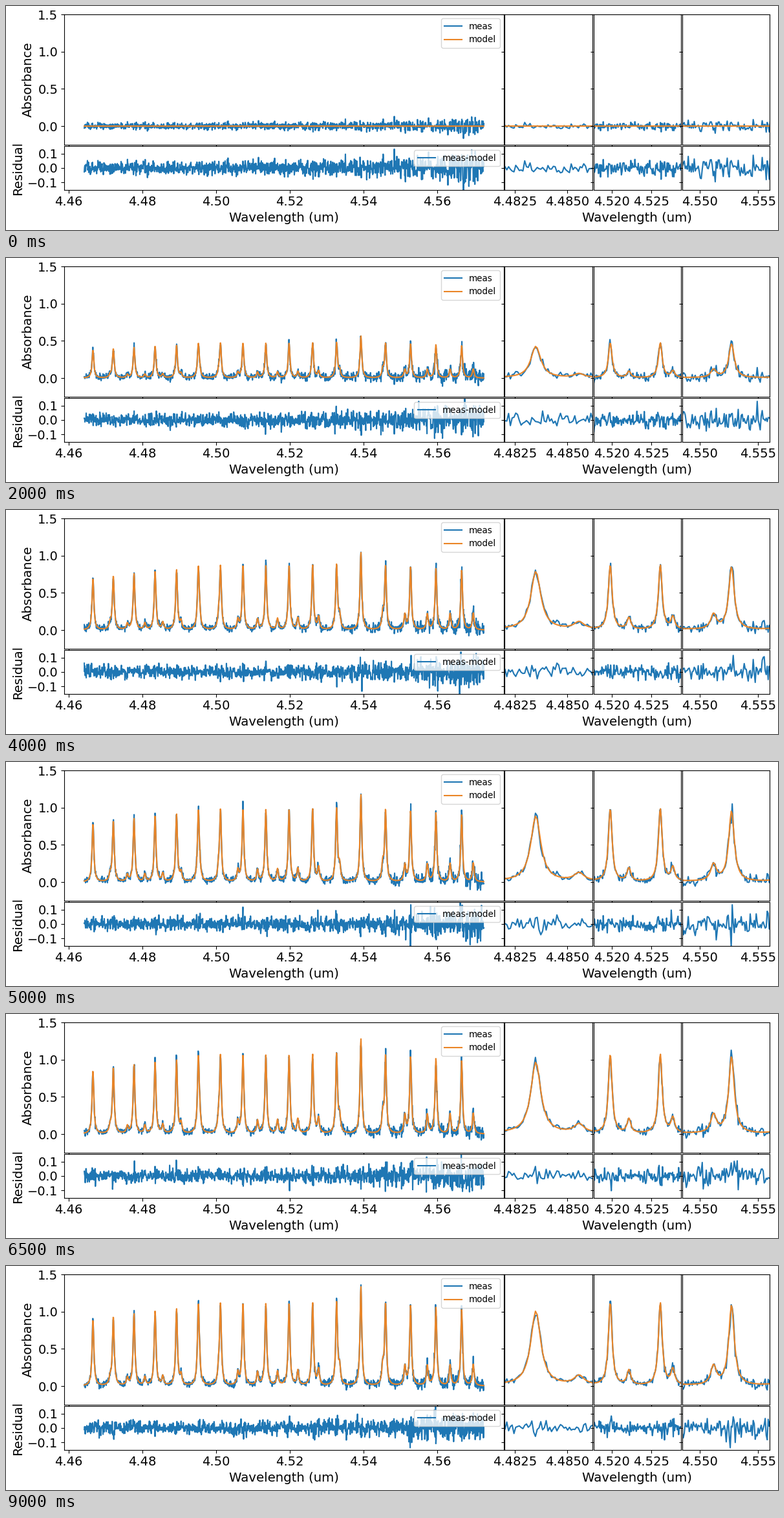
A matplotlib script that plays this animation: 1194 px wide and 347 px high, repeating every 9.5 s.

```python
import numpy as np
import matplotlib.pyplot as plt
from matplotlib.animation import FuncAnimation
from matplotlib.ticker import FormatStrFormatter, MultipleLocator

W, H, DPI = 1194, 347, 100
FRAMES, INTERVAL = 19, 500
BLUE, ORANGE = "#1f77b4", "#ea8527"
HALF_WIDTH = 0.00029
plt.rcParams.update({"font.family": "DejaVu Sans", "axes.labelsize": 14.2,
                     "xtick.labelsize": 14, "ytick.labelsize": 14,
                     "legend.fontsize": 9.75, "legend.borderaxespad": 0.45})

wave = np.linspace(4.4643, 4.57255, 1260)
span = np.linspace(0, 1, wave.size)


def band(count, start, step, stretch, height):
    """Lorentzian lines whose spacing widens steadily."""
    n = np.arange(count)[:, None]
    center = start + step * n + stretch * n**2
    return (height(n) / (1 + ((wave - center) / HALF_WIDTH) ** 2)).sum(axis=0)


strong = band(17, 4.46665, 0.0054684, 4.85e-5,
              lambda n: 1.12 - 0.0023 * (n - 10) ** 2)
weak = band(19, 4.4713, 0.004615, 4.73e-5, lambda n: 0.09 + 0.011 * n)


def spectrum(frame):
    seconds = frame * INTERVAL / 1000
    strength = 1 - np.exp(-((seconds / 3.04) ** 1.45))
    model = strength * (strong + weak)
    sigma = (0.02 + 0.036 * span**4) * (1.15 - 0.15 * strength)
    rng = np.random.default_rng(100 + frame)
    return model, rng.normal(0, sigma * np.exp(0.6 * model))


fig = plt.figure(figsize=(W / DPI, H / DPI), dpi=DPI, facecolor="white")
meas_lines, model_lines, resid_lines = [], [], []


def add_axes(left, width, top, bottom, **limits):
    ax = fig.add_axes([left / W, 1 - bottom / H, width / W, (bottom - top) / H])
    ax.set(**limits)
    return ax


def add_panel(left, width, xlim, step, fmt):
    upper = add_axes(left, width, 13.2, 214.9, xlim=xlim, ylim=(-0.25, 1.5))
    lower = add_axes(left, width, 217.3, 284.7, xlim=xlim, ylim=(-0.15, 0.15))
    upper.yaxis.set_major_locator(MultipleLocator(0.5))
    lower.yaxis.set_major_locator(MultipleLocator(0.1))
    for ax in (upper, lower):
        ax.xaxis.set_major_locator(MultipleLocator(step))
        ax.xaxis.set_major_formatter(FormatStrFormatter(fmt))
        ax.tick_params(labelleft=not meas_lines, labelbottom=ax is lower)
    meas_lines.extend(upper.plot(wave, 0 * wave, color=BLUE, label="meas"))
    model_lines.extend(upper.plot(wave, 0 * wave, color=ORANGE, label="model"))
    resid_lines.extend(lower.plot(wave, 0 * wave, color=BLUE, label="meas-model"))
    return upper, lower


main, residual = add_panel(90.2, 679.6, (4.45889, 4.57796), 0.02, "%.2f")
main.set_ylabel("Absorbance")
residual.set_ylabel("Residual")
main.legend(loc="upper right")
residual.legend(loc="upper right")

zooms = [((4.48200, 4.48620), 0.0025, "%.4f"),
         ((4.51766, 4.52882), 0.005, "%.3f"),
         ((4.54848, 4.55600), 0.005, "%.3f")]
zoom_axes = [add_panel(771.4 + 137.3 * i, 135.2, *zoom)
             for i, zoom in enumerate(zooms)]
for ax in (residual, zoom_axes[1][1]):
    ax.set_xlabel("Wavelength (um)")


def update(frame):
    model, noise = spectrum(frame)
    for lines, data in ((meas_lines, model + noise), (model_lines, model),
                        (resid_lines, noise)):
        for line in lines:
            line.set_ydata(data)
    return meas_lines + model_lines + resid_lines


anim = FuncAnimation(fig, update, frames=FRAMES, interval=INTERVAL,
                     repeat=True, repeat_delay=0)
plt.show()
```
